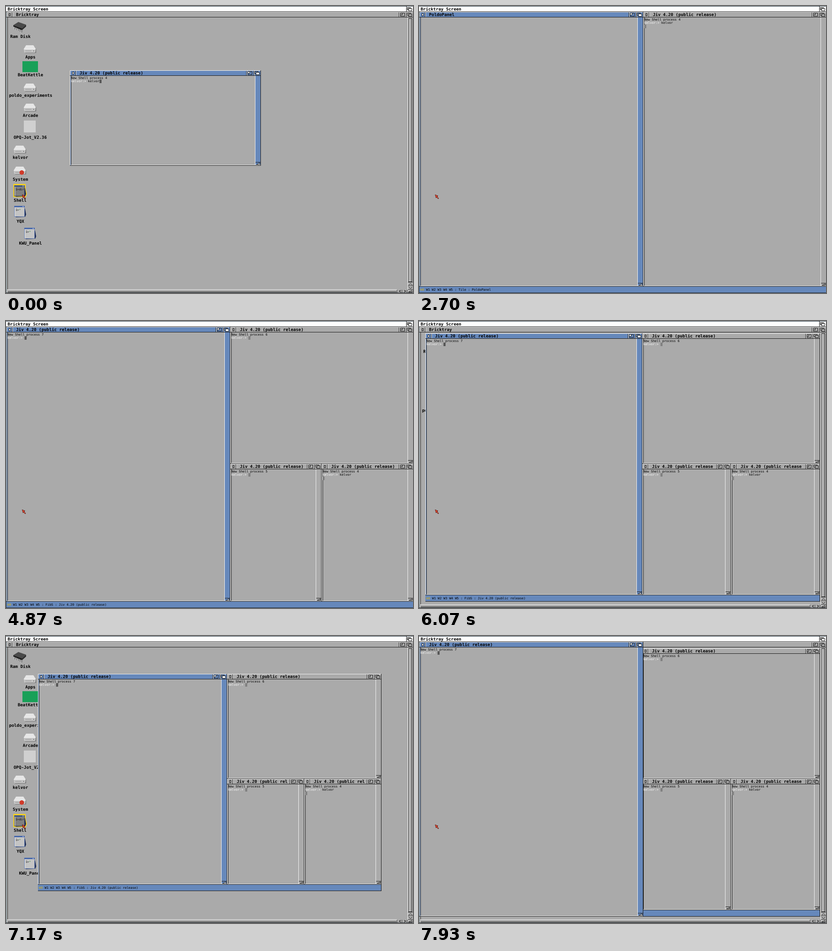
Animation of 891x629 px, one loop 8 s. Source, as an HTML page with a canvas:

```html
<!DOCTYPE html>
<html lang="en">
<head>
<meta charset="utf-8">
<title>Tiling desktop</title>
<style>
html, body { margin: 0; width: 891px; height: 629px; overflow: hidden; background: #aaa; }
canvas { display: block; }
</style>
</head>
<body>
<canvas id="stage" width="891" height="629"></canvas>
<script>
const ctx = document.getElementById('stage').getContext('2d');
const GRAY = '#aaaaaa', BLUE = '#6688bb', WHITE = '#fff', BLACK = '#000';
const LIGHT = '#f0f0f0', DARK = '#1c1c1c';
const BIG = 'bold 9.25px "DejaVu Sans Mono", monospace';
const SMALL = '6.94px "DejaVu Sans Mono", monospace';
const TINY = '6px "DejaVu Sans Mono", monospace';
const CHAR = 4.18, ROW = 7.66, GAP = 13.92;
const APP = 'Jiv 4.20 (public release)', HOST = 'PoldoPanel', PROMPT = 'kelvor:>';

const fill = (c, x, y, w, h) => { ctx.fillStyle = c; ctx.fillRect(x, y, w, h); };

function frame(x, y, w, h, inside, edge = DARK) {
  fill(edge, x, y, w, h);
  fill(inside, x + 1, y + 1, w - 2, h - 2);
}

function text(s, x, y, font = SMALL, color = BLACK, align = 'left') {
  ctx.font = font;
  ctx.fillStyle = color;
  ctx.textAlign = align;
  ctx.fillText(s, x, y);
}

function poly(color, ...pts) {
  ctx.fillStyle = color;
  ctx.beginPath();
  for (let i = 0; i < pts.length; i += 2) ctx.lineTo(pts[i], pts[i + 1]);
  ctx.fill();
}

function line(color, ...pts) {
  ctx.strokeStyle = color;
  ctx.lineWidth = 1;
  ctx.beginPath();
  for (let i = 0; i < pts.length; i += 2) ctx.lineTo(pts[i], pts[i + 1]);
  ctx.stroke();
}

function separator(x, y) {
  fill(DARK, x, y + 1, 1, 10);
  fill(LIGHT, x + 1, y + 1, 1, 10);
}

function depthGadget(x, y, back, front) {
  frame(x, y, 8, 6, back);
  frame(x + 3, y + 2, 8, 6, front);
}

// Window border, title bar and gadgets
function chrome({ x, y, r, b }, title, active) {
  const w = r - x, h = b - y, tint = active ? BLUE : GRAY, lit = active ? WHITE : GRAY;
  fill(tint, x, y, w, h);
  fill(GRAY, x + 3, y + 12, w - 16, h - 14);
  fill(LIGHT, x, y, w, 1);
  fill(LIGHT, x, y, 1, h);
  fill(DARK, x + 2, y + 12, 1, h - 13);
  fill(LIGHT, r - 13, y + 12, 1, h - 13);
  fill(LIGHT, x + 2, b - 2, w - 3, 1);
  fill(DARK, x, y + 11, w, 1);
  fill(DARK, r - 1, y, 1, h);
  fill(DARK, x, b - 1, w, 1);

  frame(x + 5, y + 3, 4, 6, lit);
  separator(x + 12, y);
  separator(r - 32, y);
  frame(r - 29, y + 2, 10, 8, tint);
  frame(r - 29, y + 2, 5, 5, lit);
  separator(r - 16, y);
  depthGadget(r - 14, y + 2, tint, lit);

  fill(DARK, r - 12, b - 8, 11, 1);
  poly(lit, r - 10, b - 2, r - 2, b - 6, r - 2, b - 2);
  line(DARK, r - 10, b - 2.5, r - 2.5, b - 6, r - 2.5, b - 2.5, r - 10, b - 2.5);

  const room = Math.floor((w - 56) / 5.57);
  text(title.slice(0, Math.max(room, 0)), x + 21, y + 9, BIG);
}

// Shell window; process 4 has had the command typed
function shell(box, n, { active = false, title = APP, blank = false, typed = false } = {}) {
  chrome(box, title, active);
  if (blank) return;
  const x = box.x + 2, base = i => box.y + 18.5 + ROW * i;
  text('New Shell process ' + n, x, base(0));
  text(PROMPT, x, base(1), SMALL, WHITE);
  let col = 9, row = 1;
  if (n === 4) {
    text('kelvor', x + 9 * CHAR, base(1));
    if (typed) col = 15; else [col, row] = [0, 2];
  }
  fill(active ? '#555' : '#808080', x + col * CHAR, base(row) - 5.8, CHAR + .3, ROW);
}

// ---- Desktop ----
function drive(x, y) {
  poly('#777', x - 12, y + 3, x + 14, y, x + 14, y + 9, x - 10, y + 9);
  poly('#e6e6e6', x - 8, y - 8, x + 8, y - 8, x + 13, y, x - 13, y);
  poly('#c8c8c8', x - 13, y, x + 13, y, x + 12, y + 8, x - 12, y + 8);
  fill('#f6f6f6', x - 13, y, 26, 1);
  fill('#8a8a8a', x - 10, y + 4, 14, 1);
  fill('#555', x + 7, y + 4, 3, 1);
}

function chip(x, y) {
  for (let i = 0; i < 5; i++) {
    const px = x + 2.5 + i * 3.7, py = y + 9 + i * 1.7;
    line('#222', px + 1, py, px + 1, py + 7);
    line('#ddd', px, py, px, py + 7);
  }
  poly('#4a4a4a', x, y + 7, x + 11, y, x + 28, y + 6, x + 19, y + 14);
  poly('#1e1e1e', x, y + 7, x + 19, y + 14, x + 19, y + 18, x, y + 10);
  poly('#2c2c2c', x + 19, y + 14, x + 28, y + 6, x + 28, y + 10, x + 19, y + 18);
}

function shellIcon(x, y, label, picked) {
  if (picked) poly('#f5d020', x - 2, y - 3, x + 25, y - 3, x + 25, y + 8, x + 28, y + 19, x + 25, y + 26, x - 2, y + 26);
  poly('#1c2c58', x + 22, y + 2, x + 24, y + 8, x + 26, y + 19, x + 24, y + 24, x + 3, y + 25);
  frame(x, y, 23, 24, picked ? '#808080' : '#c4c4c4', picked ? '#39425a' : '#6a82b4');
  fill(picked ? '#35508a' : '#4466aa', x, y, 23, 3);
  fill('#dde', x + 18, y + 1, 3, 1);
  fill('#e8e8e8', x + 1, y + 3, 1, 20);
  text('1>', x + 3, y + 11, TINY);
  text(label, x + 10.5, y + 11, TINY, picked ? BLACK : '#1a9a2a');
}

const labels = [
  ['Ram Disk', 31.5, 67], ['Apps', 53.5, 112], ['BeatKettle', 53.5, 151],
  ['poldo_experiments', 54, 195.5], ['Arcade', 53.5, 240], ['OPQ-Jot_V2.36', 53, 287.5],
  ['kelvor', 31.5, 332], ['System', 31.5, 380], ['Shell', 31, 426],
  ['YQX', 31.5, 472], ['KWU_Panel', 53.5, 519.5]
];

function scrollbars() {
  fill(GRAY, 3, 621, 888, 7);
  fill(LIGHT, 3, 621, 853, 1);
  fill(DARK, 4, 626, 851, 1);
  for (const x of [856, 867, 878]) { fill(DARK, x, 622, 1, 6); fill(LIGHT, x + 1, 622, 1, 6); }
  line(DARK, 865, 623, 860, 625, 865, 627);
  line(DARK, 871, 623, 876, 625, 871, 627);

  fill(LIGHT, 879, 25, 1, 597);
  frame(881, 27, 8, 578, GRAY);
  fill(LIGHT, 882, 28, 1, 576);
  for (const y of [605, 613, 621]) { fill(DARK, 880, y, 11, 1); fill(LIGHT, 881, y + 1, 10, 1); }
  line(DARK, 881.5, 612, 885.5, 608, 889.5, 612);
  line(DARK, 881.5, 615.5, 885.5, 619.5, 889.5, 615.5);
  line(DARK, 881, 627, 889, 623, 889, 627, 881, 627);
}

function desktop() {
  chrome({ x: 1, y: 13, r: 892, b: 629 }, 'Bricktray', false);
  scrollbars();
  chip(16, 35);
  for (const [x, y] of [[52, 94], [52, 178], [52, 222], [30, 314], [30, 360]]) drive(x, y);
  fill('#18a058', 36, 121, 34, 24);
  fill('#d0d0d0', 39, 251, 26, 26);
  ctx.fillStyle = '#d03a2a';
  ctx.beginPath();
  ctx.arc(34.5, 365, 5, 0, 7);
  ctx.fill();
  shellIcon(18, 393, 'dir', true);
  shellIcon(18, 438, '*');
  shellIcon(40, 486, '*');
  for (const [s, x, y] of labels) text(s, x, y + 3.4, BIG, BLACK, 'center');
}

function screenBar() {
  fill(WHITE, 0, 0, 891, 12);
  fill(DARK, 0, 12, 891, 1);
  text('Bricktray Screen', 3.5, 10, BIG);
  fill(DARK, 876, 1, 1, 11);
  depthGadget(878, 3, GRAY, WHITE);
}

function pointer() {
  poly('#400', 35, 413, 42, 416, 40, 418, 43.5, 421.5, 42, 423, 38.5, 419.5, 37, 421);
  poly('#e04a30', 36, 414, 40.5, 416, 39, 417.6, 42.5, 421.2, 41.5, 422, 38.3, 418.6, 37.2, 419.8);
}

// ---- Tiling ----
// Cells are fractions of the work area inside `k` gap steps
function place(k, [x0, y0, x1, y1]) {
  const g = k * GAP, top = 13.42 + g, h = 600.78 - 2 * g, w = 891 - 2 * g;
  return {
    x: Math.floor(g + x0 * w) + 1,
    y: Math.floor(top + y0 * h),
    r: Math.floor(g + x1 * w) + 1,
    b: Math.floor(top + y1 * h) + (y1 === 1 ? 1 : 0)
  };
}

const MAIN = .55, SIDE = 1 - MAIN;
const layouts = {
  Tile: n => Array.from({ length: n }, (_, i) => [MAIN, i / n, 1, (i + 1) / n]),
  Cols: n => Array.from({ length: n }, (_, i) => [MAIN + SIDE * i / n, 0, MAIN + SIDE * (i + 1) / n, 1]),
  FibS: () => [[MAIN, 0, 1, .5], [MAIN, .5, MAIN + SIDE / 2, 1], [MAIN + SIDE / 2, .5, 1, 1]]
};

function statusBar(k, layout, title) {
  const { x, r, b } = place(k, [0, 0, 1, 1]);
  const end = Math.floor(628.5 - k * GAP) + 1;
  fill(DARK, x, b - 1, r - x, end - b + 1);
  fill(BLUE, x, b, r - x - 1, end - b - 1);
  text('W0', x + 2, b + 8.5, SMALL, '#d8b018');
  text(`W1 W2 W3 W4 W5 : ${layout} : ${title}`, x + 2 + 3 * CHAR, b + 8.5);
}

// `lead` is the gap of the main window when it moves ahead of the rest
function tiled({ ids = [7, 6, 5, 4], layout = 'FibS', gap = 0, lead = gap, status = APP, title, blank, torn }) {
  const [first, ...rest] = ids, cells = layouts[layout](rest.length);
  if (torn) {
    const a = place(gap, [0, 0, 1, 1]);
    fill(GRAY, a.x, a.y, a.r - a.x, a.b - a.y + 14);
  }
  rest.forEach((n, i) => shell(place(gap, cells[i]), n));
  statusBar(gap, layout, status);
  shell(place(lead, [0, 0, rest.length ? MAIN : 1, 1]), first, { active: true, title, blank });
  if (torn) {
    // Second window caught mid-move: shifted but still at its old width
    const p = place(gap, cells[0]), next = place(lead, cells[0]);
    ctx.save();
    ctx.beginPath();
    ctx.rect(p.x - 1, next.y, next.r - p.x + 1, p.b - next.y - 3);
    ctx.clip();
    shell({ x: p.x - 1, y: next.y, r: p.r - 1, b: p.b + 14 }, rest[0]);
    ctx.restore();
  }
}

const loose = () => shell({ x: 140, y: 141, r: 558, b: 350 }, 4, { active: true, typed: true });
const three = { ids: [6, 5, 4], layout: 'Tile', status: HOST };
const two = { ids: [5, 4], layout: 'Tile', status: HOST };

const steps = [
  [0, null],
  [1330, { ids: [4], layout: 'Tile' }],
  [2700, { ...two, title: HOST, blank: true }],
  [2870, { ...two, title: HOST }],
  [3030, two],
  [3170, three],
  [3330, { layout: 'Tile', status: HOST }],
  [4730, { layout: 'Cols' }],
  [4870, {}],
  [6070, { gap: 1 }],
  [6300, { gap: 2 }],
  [6430, { gap: 3, lead: 4, torn: true }],
  [6570, { gap: 4 }],
  [6730, { gap: 5 }],
  [6970, { gap: 6 }],
  [7170, { gap: 5 }],
  [7300, { gap: 4 }],
  [7430, { gap: 4, lead: 3 }],
  [7570, { gap: 3 }],
  [7690, { gap: 2 }],
  [7810, { gap: 1 }],
  [7930, { gap: 1, lead: 0 }]
];

function draw(state) {
  ctx.textRendering = 'geometricPrecision';
  fill(GRAY, 0, 0, 891, 629);
  desktop();
  if (state) tiled(state); else loose();
  screenBar();
  pointer();
  fill('#1c2c38', 0, 0, 891, 1);
  fill('#2c4048', 0, 13, 1, 616);
  fill('#20262c', 0, 628, 891, 1);
}

let shown = -1;
function tick() {
  const t = performance.now() % 8000;
  const now = steps.findLastIndex(([at]) => at <= t);
  if (now !== shown) draw(steps[shown = now][1]);
  requestAnimationFrame(tick);
}
tick();
</script>
</body>
</html>
```
